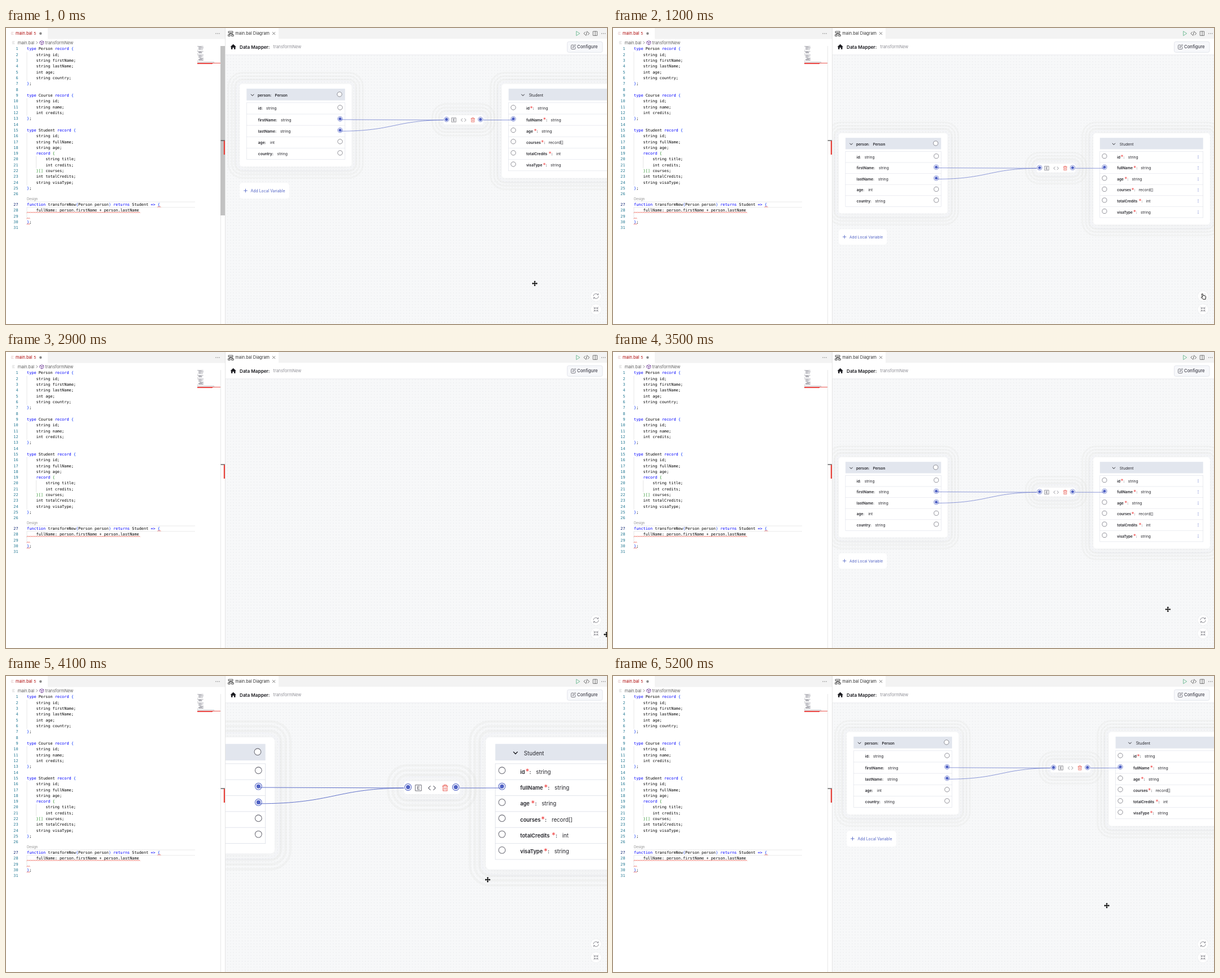
An HTML page that plays this animation: 1065x526 px, repeating every 5300 ms.

```html
<!DOCTYPE html>
<html lang="en">
<head>
<meta charset="utf-8">
<title>Data Mapper</title>
<style>
  html, body { margin: 0; width: 100%; height: 100%; overflow: hidden; background: #fff; }
  svg { display: block; width: 100%; height: 100%; }
  text { font-family: Inter, "Open Sans", sans-serif; font-size: 7.4px; white-space: pre; }
  .code { font-family: "DejaVu Sans Mono", "Liberation Mono", monospace; font-size: 6.88px; }
  .num { fill: #237893; text-anchor: end; }
  .field { font-size: 6.9px; fill: #26262c; }
  .label { font-size: 6.6px; font-weight: 600; fill: #222228; }
  .line { fill: none; stroke-linecap: round; stroke-linejoin: round; }
</style>
</head>
<body>
<svg id="stage" viewBox="0 0 1065 526" preserveAspectRatio="none"></svg>
<script>
const SOURCE = `type Person record {
    string id;
    string firstName;
    string lastName;
    int age;
    string country;
};

type Course record {
    string id;
    string name;
    int credits;
};

type Student record {
    string id;
    string fullName;
    string age;
    record {
        string title;
        int credits;
    }[] courses;
    int totalCredits;
    string visaType;
};

function transformNew(Person person) returns Student => {
    fullName: person.firstName + person.lastName

};
`.split('\n');

const BLUE = '#5062c4', GREY = '#616161', RED = '#e51400';
const CHAR = 4.142, LINE = 10.32, CODE_X = 37;

const rect = (x, y, w, h, fill, extra = '') =>
  `<rect x="${x}" y="${y}" width="${w}" height="${h}" fill="${fill}" ${extra}/>`;
const text = (x, y, s, extra = '') => `<text x="${x}" y="${y}" ${extra}>${s}</text>`;
const line = (d, color, width = 0.8, extra = '') =>
  `<path class="line" d="${d}" stroke="${color}" stroke-width="${width}" ${extra}/>`;
const dots = (x, y, dx, dy, r, color) => [-1, 0, 1].map(i =>
  `<circle cx="${x + i * dx}" cy="${y + i * dy}" r="${r}" fill="${color}"/>`).join('');
const escapeText = s => s.replace(/</g, '&lt;').replace(/>/g, '&gt;');

// ---------- editor ----------
const lineY = i => 37 + i * LINE + (i > 25 ? 8.4 : 0);

function squiggle(x, y, width) {
  let d = `M${x} ${y}`;
  for (let i = 0; i < width / 1.3; i++) d += `l1.3 ${i % 2 ? 1.1 : -1.1}`;
  return line(d, RED, 0.6);
}

function codeLines() {
  const brackets = ['#0431fa', '#319331', '#7b3814'];
  let depth = 0;
  const paint = token => {
    if (/^(type|record|function|returns|=>)$/.test(token)) return '#0000ff';
    if (/[{([]/.test(token)) return brackets[depth++];
    if (/[})\]]/.test(token)) return brackets[--depth];
    return '#000';
  };
  return SOURCE.map((raw, i) => {
    const indent = raw.search(/\S|$/);
    const spans = (raw.trim().match(/\w+|=>|[{}()[\]]|[^\w{}()[\]=]+|=/g) || [])
      .map(t => `<tspan fill="${paint(t)}">${escapeText(t)}</tspan>`).join('');
    const y = lineY(i) + 2.4;
    return text(21.6, y, i + 1, `class="code num" ${i === 26 ? 'style="fill:#0b216f"' : ''}`) +
      text(CODE_X + indent * CHAR, y, spans, 'class="code"');
  }).join('');
}

function guides() {
  const spans = [[1, 5, 0], [9, 11, 0], [15, 23, 0], [27, 28, 0], [19, 20, 4]];
  return spans.map(([a, b, col]) =>
    rect(CODE_X + col * CHAR - 0.3, lineY(a) - 5, 0.6, lineY(b) - lineY(a) + LINE, '#d6d6d6')).join('');
}

function minimap() {
  const rows = SOURCE.slice(0, 27).map((s, i) => {
    const indent = s.search(/\S|$/);
    return rect(339 + indent * 0.53, 32.4 + i * 1.08, (s.length - indent) * 0.53, 0.65, '#8c8c96');
  });
  return rows.join('') + rect(339, 61.9, 41, 0.9, '#e8413a') + rect(339, 62.8, 27, 1.1, '#e51f1f');
}

const editor = () =>
  rect(0, 0, 388.5, 526, '#fff') + rect(74, 0, 314.5, 19.5, '#f3f3f3') +
  line('M9.5 7.5h3.5M9 9.5h3M9.5 11.5h3.5', '#dcb9b9', 0.7) +
  text(17, 12.2, 'main.bal', 'fill="#ad0707"') + text(49.3, 12.2, '5', 'fill="#ad0707" style="font-size:6.6px"') +
  '<circle cx="61.3" cy="9.7" r="2.2" fill="#8a8a8a"/>' + dots(375, 9.8, 3, 0, 0.65, '#444') +
  line('M11.5 24h3.5M11 26h3M11.5 28h3.5', '#c4c4c4', 0.7) +
  text(20.7, 28.7, 'main.bal', `fill="${GREY}"`) + line('M53.7 23.8l2.2 2.2-2.2 2.2', GREY, 0.7) +
  line('M60.2 24.3l3.3-1.6 3.3 1.6v3.6l-3.3 1.8-3.3-1.8zM60.2 24.3l3.3 1.6 3.3-1.6M63.5 25.9v3.8', '#652d90', 0.75) +
  text(69.5, 28.7, 'transformNew', `fill="${GREY}"`) +
  line('M37 309H334.5M37 318.7H334.5', '#e4e4e4', 0.8) + guides() + codeLines() +
  text(37, 306.4, 'Design', 'fill="#919191" style="font-size:5.9px"') +
  squiggle(37, 328.3, 199) + squiggle(268.8, 318.3, 4) + squiggle(37, 338.6, 4) + squiggle(37, 348.9, 4) +
  minimap() + rect(380, 32, 0.7, 494, '#dedede') +
  rect(380, 32, 8, 301, '#c2c2c2', 'id="scrollbar"') +
  rect(380.5, 199.4, 7.5, 1.2, '#3c3c3c') + rect(385.8, 200.5, 2.3, 24.5, '#e8413a') +
  rect(388, 0, 0.8, 526, '#dedede');

// ---------- panel around the diagram ----------
const panelHeader = () =>
  rect(388.8, 0, 677, 19.5, '#f3f3f3') + rect(388.8, 0, 94.2, 20, '#fff') +
  rect(388.8, 19.5, 677, 28, '#fff') + rect(388.8, 47.4, 677, 0.8, '#e3e4ea') +
  line('M394.5 6h7.5v2.6h-7.5zM394 11.8h3.2v2.6h-3.2zM400 11.8h3.2v2.6h-3.2zM398.3 8.6v1.6M395.6 11.8v-1.6h6v1.6', '#222', 0.8) +
  text(406.3, 12.2, 'main.bal Diagram', 'fill="#333"') +
  line('M472.4 7.4l4.4 4.4m0-4.4l-4.4 4.4', '#444', 0.7) +
  line('M1011 6l5.8 3.7-5.8 3.7z', '#4fae7c', 0.75) +
  line('M1026.6 7l-2.6 2.7 2.6 2.7M1031 7l2.6 2.7-2.6 2.7M1029.8 6l-2 7.4', '#333', 0.75) +
  line('M1040.6 6h7v7.4h-7zM1044.1 6v7.4', '#444', 0.7) + dots(1058.7, 9.8, 3, 0, 0.65, '#444') +
  '<path d="M402.7 28.8l5.2 4.6h-1.4v4.3h-2.6v-3h-2.4v3h-2.6v-4.3h-1.4z" fill="#1d1d22"/>' +
  text(414, 36.6, 'Data Mapper:', 'fill="#1d1d22" style="font-size:8.2px;font-weight:600"') +
  text(473.5, 36.3, 'transformNew', 'fill="#8f8f96"') +
  rect(994.5, 24.3, 62.5, 19, '#f7f8fb', 'rx="3" stroke="#dfe1e8" stroke-width=".8"') +
  line('M1005.5 30.2h-2.8q-1.2 0-1.2 1.2v5q0 1.2 1.2 1.2h5q1.2 0 1.2-1.2v-2.6M1004.3 34.6l.4-1.7 3.8-3.6 1.2 1.2-3.8 3.7z', '#40404b', 0.7) +
  text(1012, 36.4, 'Configure', 'fill="#40404b" style="font-size:7.7px;font-weight:500"');

function floatButton(id, y, icon) {
  return `<g transform="translate(1045.5 ${y})"><circle r="9" fill="#fff" filter="url(#shade)"/>
    <g id="${id}">${line(icon, '#75757d', 0.8)}</g></g>`;
}

// ---------- diagram, in unscaled stage coordinates ----------
const ROW = 20.17, TABLE_TOP = 132.8;
const rowText = i => 145.4 + i * ROW;
const rowPort = i => 141.3 + i * 20.15;

const port = (x, y, linked) =>
  `<circle cx="${x}" cy="${y}" r="4.2" fill="#fff" stroke="${linked ? BLUE : '#6b6b75'}" stroke-width=".75"/>` +
  (linked ? `<circle cx="${x}" cy="${y}" r="2.6" fill="${BLUE}"/>` : '');

// A soft shadow that falls off in visible bands.
const card = (x, y, w, h, rx = 5) => [20, 14, 8].map(d =>
  rect(x - d, y - d, w + 2 * d, h + 2 * d, 'none',
    `rx="${rx + d}" stroke="#8c8070" stroke-opacity=".05" stroke-width="3"`)).join('') +
  rect(x, y, w, h, '#fff', `rx="${rx}" filter="url(#glow)"`);

const table = (x, w, rows) =>
  rect(x, 107.8, w, 20.9, '#e2e6ee') +
  rect(x, TABLE_TOP, w, rows * ROW, 'none', 'stroke="#dcdfe7" stroke-width=".6"') +
  Array.from({ length: rows - 1 }, (_, i) =>
    line(`M${x} ${TABLE_TOP + (i + 1) * ROW}h${w}`, '#dcdfe7', 0.6)).join('');

const chevron = x => line(`M${x - 2.4} 118l2.4 2.5 2.4-2.5`, '#222228', 1);

function personCard() {
  const fields = [['id', 'string', 461], ['firstName', 'string', 487], ['lastName', 'string', 486],
    ['age', 'int', 468], ['country', 'string', 480.5]];
  return card(414, 99.4, 198.4, 146.8) + table(426.3, 174.5, 5) + chevron(436.7) +
    text(446, 121.9, 'person:', 'class="label"') + text(476.5, 121.9, 'Person', 'class="label"') +
    port(591, 117.8) +
    fields.map(([name, type, x], i) => text(446.8, rowText(i), name + ':', 'class="label"') +
      text(x, rowText(i), type, 'class="field"') + port(592, rowPort(i), i === 1 || i === 2)).join('');
}

function studentCard() {
  const fields = [['id', 'string', 942], ['fullName', 'string', 965.3], ['age', 'string', 949],
    ['courses', 'record[]', 961.6], ['totalCredits', 'int', 975], ['visaType', 'string', 965]];
  return card(878.6, 99.4, 213, 167) + table(890.6, 188.4, 6) + chevron(916) +
    text(926.7, 121.9, 'Student', 'class="field"') +
    fields.map(([name, type, x], i) => {
      const y = rowText(i);
      return text(922, y, name, 'class="label"') + text(x - 8.4, y, ':', 'class="label"') +
        line(`M${x - 11} ${y - 6.3}v3.4m-1.5-2.5l3 1.6m0-1.6l-3 1.6`, '#ef4444', 0.7) +
        text(x, y, type, 'class="field"') + port(899, rowPort(i), i === 1) +
        dots(1070, y - 2.6, 0, 2.4, 0.6, BLUE);
    }).join('');
}

const links = () =>
  line('M592 162.8L780.5 163.5M592 183.3C688 183.3 688 163.5 780.5 163.5M841 163.5H899', BLUE, 0.65);

const expressionNode = () =>
  card(775.4, 155, 70.4, 16.3, 4) + port(780.6, 162.4, true) + port(840.8, 162.4, true) +
  line('M790 159.7h7.4v7.4h-7.4zM795 161.4h-2.5v4h2.5m-2.5-2h2.2', '#6b6b75', 0.7) +
  line('M808.8 161l-2.6 2.5 2.6 2.5M812.6 161l2.6 2.5-2.6 2.5', '#6b6b75', 0.75) +
  line('M824 161h6.6M825.8 161v-1.4h3v1.4M824.7 161v6.1h5.2v-6.1M826.4 162.8v2.6M828.2 162.8v2.6', '#e9635a', 0.75);

const addVariable = () =>
  rect(414, 275.2, 88, 28, '#fff', 'rx="5"') + line('M421.6 289h5.8m-2.9-2.9v5.8', BLUE, 0.85) +
  text(433.5, 291.5, 'Add Local Variable', `fill="${BLUE}" style="font-size:6.9px"`);

const MOVE = 'M0-5l1.9 2.2H.7v2.1h2.1v-1.2L5 0 2.8 1.9V.7H.7v2.1h1.2L0 5l-1.9-2.2h1.2V.7h-2.1v1.2L-5 0l2.2-1.9v1.2h2.1v-2.1h-1.2z';
const HAND = 'M-2.4-4.6c.9-.4 1.5.1 1.7.8l.5 2.1 2.8.5c1.4.3 2 .9 1.9 2.2l-.5 4.1h-4.3l-2.9-3.2c-.6-.9.3-1.7 1.1-1.2l.9.6-1.4-4.5c-.2-.6-.2-1.1.2-1.4z';

document.getElementById('stage').innerHTML = `
  <defs>
    <pattern id="grid" width="5.2" height="5.2" patternUnits="userSpaceOnUse">
      <circle cx="2.6" cy="2.6" r=".6" fill="#dedfe3"/></pattern>
    <filter id="glow" x="-50%" y="-150%" width="200%" height="400%">
      <feDropShadow dx="0" dy="1" stdDeviation="8" flood-color="#64646e" flood-opacity=".07"/></filter>
    <filter id="shade" x="-50%" y="-50%" width="200%" height="200%">
      <feDropShadow dx="0" dy="0" stdDeviation="1.2" flood-color="#000" flood-opacity=".08"/></filter>
    <clipPath id="canvas"><rect x="388.8" y="48" width="676.2" height="478"/></clipPath>
  </defs>
  ${rect(388.8, 48, 677, 478, '#f7f8f9')}${rect(388.8, 48, 677, 478, 'url(#grid)')}
  <g clip-path="url(#canvas)"><g id="diagram">
    ${personCard()}${studentCard()}${addVariable()}${links()}${expressionNode()}
  </g></g>
  ${panelHeader()}
  ${floatButton('reset', 476.5, 'M-4.6-.4A4.6 4.4 0 0 1 3.6-2.8M4.2-4.6v2.2h-2.3M4.6.4A4.6 4.4 0 0 1-3.6 2.8M-4.2 4.6v-2.2h2.3')}
  ${floatButton('fit', 500, 'M-4-4l2.6 2.6m0-2.2v2.2h-2.2M4-4l-2.6 2.6m0-2.2v2.2h2.2M-4 4l2.6-2.6m0 2.2v-2.2h-2.2M4 4l-2.6-2.6m0 2.2v-2.2h2.2')}
  ${editor()}
  <g id="cursor">
    <path id="move" d="${MOVE}" fill="#000" stroke="#fff" stroke-width=".8" paint-order="stroke"/>
    <path id="hand" d="${HAND}" fill="#fff" stroke="#111" stroke-width="1" stroke-linejoin="round"/>
  </g>`;

// ---------- motion ----------
const LOOP = 5300, STEP = 100;
const FIT = [0.971, -2, 90.5], HOME = [1, 0, 0], AWAY = [1, 0, -340];
const ZOOMED = [1.1466, -156.8, 41.3], CLOSE = [1.665, -613, -103];

const viewKeys = [
  [0, ...HOME], [400, ...HOME], [500, ...FIT], [1200, ...FIT], [1300, ...HOME], [1500, ...HOME],
  [1600, 1, 0, -11.5], [1700, 1, 0, -110], [1800, 1, 0, -250], [1900, ...AWAY], [3200, ...AWAY],
  [3300, ...FIT], [3800, ...FIT], [3900, ...ZOOMED], [4300, ...CLOSE], [4500, ...CLOSE],
  [4600, ...HOME], [LOOP, ...HOME]
];
const cursorKeys = [
  [0, 937, 454], [100, 985, 478], [300, 1046, 505], [500, 1047, 503], [800, 1047, 503],
  [1200, 1046, 477], [1300, 1045, 476], [1500, 860, 495], [1600, 860, 484], [1700, 860, 385],
  [1800, 861, 245], [1900, 864, 175], [2100, 872, 230], [2400, 907, 488], [2500, 957, 470],
  [2600, 957, 470], [2900, 1064, 502], [3100, 1048, 504], [3400, 1047, 503], [3700, 856, 366],
  [3800, 853, 362], [4300, 854, 362], [4400, 950, 425], [4500, 1046, 475], [4700, 1045, 475],
  [5000, 870, 404], [5200, 875, 408], [LOOP, 937, 454]
];

function sample(keys, t) {
  const i = keys.findIndex(k => k[0] > t);
  const a = keys[i - 1], b = keys[i], u = (t - a[0]) / (b[0] - a[0]);
  return a.slice(1).map((v, j) => v + (b[j + 1] - v) * u);
}

const [diagram, cursor, move, hand, reset, fit, scrollbar] =
  ['diagram', 'cursor', 'move', 'hand', 'reset', 'fit', 'scrollbar'].map(id => document.getElementById(id));

function draw(now) {
  const t = Math.floor((now % LOOP) / STEP) * STEP;
  const [s, x, y] = sample(viewKeys, t);
  const [cx, cy] = sample(cursorKeys, t);
  const over = by => Math.hypot(cx - 1045.5, cy - by) < 10;
  const onReset = over(476.5), onFit = over(500);
  diagram.setAttribute('transform', `translate(${x} ${y}) scale(${s})`);
  cursor.setAttribute('transform', `translate(${cx} ${cy})`);
  move.style.display = onReset || onFit ? 'none' : '';
  hand.style.display = onReset || onFit ? '' : 'none';
  reset.style.opacity = onReset ? 0.25 : 1;
  fit.style.opacity = onFit ? 0.25 : 1;
  scrollbar.style.display = t < STEP ? '' : 'none';
}

const start = performance.now();
function tick() {
  draw(performance.now() - start);
  requestAnimationFrame(tick);
}
tick();
</script>
</body>
</html>
```
